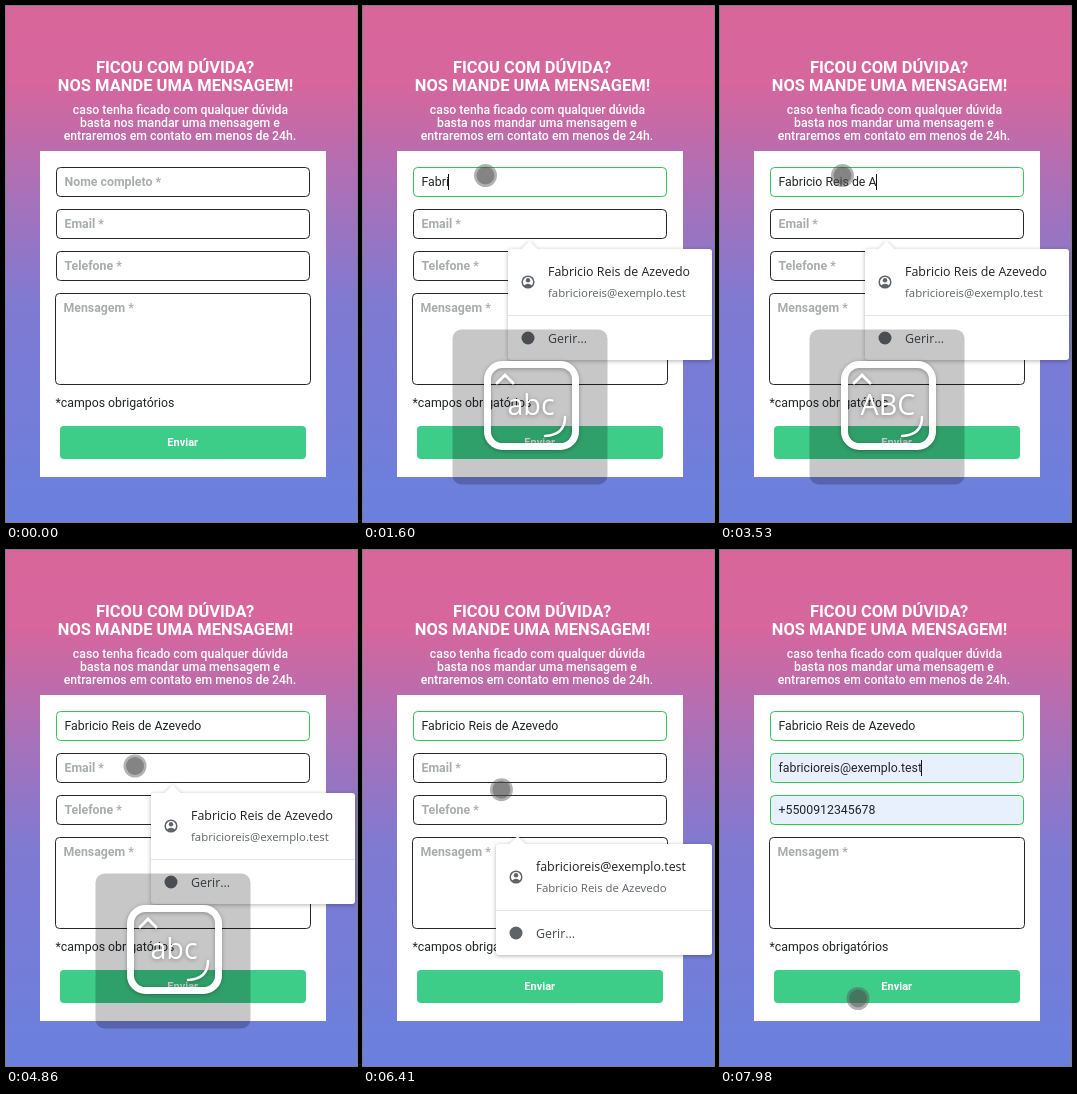
Recreate the animation shown at these times as an HTML page. Size 351 px wide and 516 px high, loop 8000 ms.

```html
<!DOCTYPE html>
<html lang="pt">
<head>
<meta charset="utf-8">
<style>
html, body { margin: 0; width: 100%; height: 100%; overflow: hidden; }
svg { display: block; width: 351px; height: 516px; }
text { font: 12.32px Roboto, sans-serif; fill: #212529; white-space: pre; }
.title { font-size: 16.5px; font-weight: 700; fill: #fff; text-anchor: middle; }
.sub { font-size: 12.25px; font-weight: 500; fill: #fff; text-anchor: middle; }
.hint { font-weight: 700; fill: #a9acae; }
.send { font-size: 11px; font-weight: 700; fill: #fff; text-anchor: middle; }
.box { fill: #fff; stroke: #24272b; }
.popup text { font: 12.4px "Open Sans", sans-serif; fill: #202124; }
.popup .small { font-size: 11.4px; fill: #5f6368; }
.popup { filter: drop-shadow(0 1px 2px rgba(0,0,0,.3)); transform-box: fill-box; }
#caps text { font: 28.7px "Open Sans", sans-serif; fill: #fff; text-anchor: middle; }
#key { fill: none; stroke: #fff; stroke-linecap: round; }
#mark { filter: drop-shadow(0 1px 2px rgba(0,0,0,.3)); }
</style>
</head>
<body>
<svg viewBox="0 0 351 516">
  <defs>
    <linearGradient id="sky" x1="0" y1="0" x2="0" y2="1">
      <stop offset="0" stop-color="#d8669b"/>
      <stop offset=".15" stop-color="#d6669c"/>
      <stop offset=".37" stop-color="#a771b9"/>
      <stop offset=".58" stop-color="#7f7ad2"/>
      <stop offset="1" stop-color="#6b80de"/>
    </linearGradient>
  </defs>
  <rect width="351" height="516" fill="url(#sky)"/>
  <text class="title" x="169" y="67">FICOU COM DÚVIDA?</text>
  <text class="title" x="169.5" y="85">NOS MANDE UMA MENSAGEM!</text>
  <text class="sub" x="174.5" y="108">caso tenha ficado com qualquer dúvida</text>
  <text class="sub" x="174" y="121">basta nos mandar uma mensagem e</text>
  <text class="sub" x="174" y="134">entraremos em contato em menos de 24h.</text>
  <rect x="34" y="145" width="286" height="326" fill="#fff"/>
  <g id="fields"></g>
  <rect class="box" x="49.5" y="287.5" width="255" height="91" rx="4"/>
  <text class="hint" x="57.5" y="306">Mensagem *</text>
  <text x="49.5" y="401">*campos obrigatórios</text>
  <rect x="54" y="420" width="246" height="33" rx="4" fill="#3dcd88"/>
  <text class="send" x="176.7" y="440">Enviar</text>
  <rect id="caret" width="1" height="16" fill="#111"/>
  <g id="popups"></g>
  <g id="caps">
    <rect x="89.5" y="323.5" width="155" height="155" rx="9" fill="#000" fill-opacity=".22"/>
    <g id="mark">
      <g id="key">
        <rect x="124.5" y="358.5" width="88" height="82" rx="15" stroke-width="7"/>
        <path d="M134 377l8-8 8 8" stroke-width="3"/>
        <path d="M202 411Q202 429 182 430" stroke-width="2.5"/>
      </g>
      <text id="label" x="168" y="409"></text>
    </g>
  </g>
  <g id="touch">
    <circle r="11.5" fill="#555" fill-opacity=".45"/>
    <circle r="9" fill="#444" fill-opacity=".42"/>
  </g>
  <path id="arrow" d="M0 0v16l3.8-3.5 2.6 6 2.6-1.2-2.6-5.8h5.2z" fill="#fff" stroke="#111"/>
</svg>
<script>
const LOOP = 8000;
const NAME = 'Fabricio Reis de Azevedo';
const MAIL = 'fabricioreis@exemplo.test';
const PHONE = '+5500912345678';

// One time per typed letter of NAME
const KEYS = [850, 1250, 1340, 1430, 1600, 1800, 1900, 2000, 2200, 2470, 2780, 2860,
  2940, 3080, 3180, 3280, 3380, 3530, 3870, 3870, 3930, 4130, 4200, 4260];
const UPPER = [[720, 1050], [2270, 2540], [3450, 3670]];
const FOCUS = 220, REFOCUS = 5500, PREVIEW = 6480, FILL = 6670;
// time, x, y of the pointer
const PATH = [[0, 122.5, 169.5], [4660, 122.5, 169.5], [4860, 129, 216], [5000, 127, 222],
  [6340, 127, 222], [6600, 189.5, 318.5], [7200, 189.5, 318.5], [7650, 138, 448.5]];

const $ = id => document.getElementById(id);
const ramp = (t, a, b) => Math.min(1, Math.max(0, (t - a) / (b - a)));
const ease = p => p * p * (3 - 2 * p);
const within = (t, [a, b]) => t >= a && t < b;

const fields = ['Nome completo *', 'Email *', 'Telefone *'].map((hint, i) => {
  const y = 161.5 + 42 * i, g = document.createElementNS('http://www.w3.org/2000/svg', 'g');
  g.innerHTML = `<rect class="box" x="50.5" y="${y}" width="253" height="29" rx="4"/>
    <text class="hint" x="58.5" y="${y + 18.5}">${hint}</text>
    <text x="58.5" y="${y + 18.5}"></text>`;
  $('fields').append(g);
  const [box, label, value] = g.children;
  return { y, box, label, value };
});

function popup(x, y, big, small) {
  const w = 349 - x, cx = x + 20, tail = x + 21.5;
  $('popups').insertAdjacentHTML('beforeend', `<g class="popup">
    <path d="M${x + 3} ${y}H${tail - 8}l8-8 8 8H346q3 0 3 3v105q0 3-3 3H${x + 3}q-3 0-3-3v-105q0-3 3-3z" fill="#fff"/>
    <rect x="${x}" y="${y + 3}" width="${w}" height="63" fill="#f1f1f1" opacity="0"/>
    <path d="M${x} ${y + 66.5}h${w}" stroke="#e4e4e4"/>
    <g fill="#5f6368"><circle cx="${cx}" cy="${y + 33}" r="5.8" fill="none" stroke="#5f6368" stroke-width="1.5"/>
    <circle cx="${cx}" cy="${y + 31.2}" r="2.2"/>
    <path d="M${cx - 4.3} ${y + 36.8}q4.3-4 8.6 0-4.3 4-8.6 0z"/>
    <circle cx="${cx}" cy="${y + 89}" r="6.5"/></g>
    <text x="${x + 40}" y="${y + 27}">${big}</text>
    <text class="small" x="${x + 40}" y="${y + 48}">${small}</text>
    <text x="${x + 40}" y="${y + 94}" style="fill:#45494d">Gerir...</text></g>`);
  return $('popups').lastElementChild;
}
const popups = [popup(145, 243, NAME, MAIL), popup(133, 294, MAIL, NAME)];

function setField(i, value, valid, blue) {
  const f = fields[i];
  f.value.textContent = value;
  f.label.style.opacity = value ? 0 : 1;
  f.box.style.stroke = valid ? '#2fc655' : '';
  f.box.style.fill = blue ? '#e8f0fe' : '';
}

function pointer(t) {
  let i = PATH.length - 1;
  while (PATH[i][0] > t) i--;
  const a = PATH[i], b = PATH[i + 1] || a;
  const p = a === b ? 0 : ease(ramp(t, a[0], b[0]));
  return `translate(${a[1] + (b[1] - a[1]) * p} ${a[2] + (b[2] - a[2]) * p})`;
}

function draw(t) {
  const typed = KEYS.filter(k => k <= t).length;
  const filled = t >= PREVIEW;
  setField(0, NAME.slice(0, typed), t >= 1250);
  setField(1, filled ? MAIL : '', t >= FILL, filled);
  setField(2, filled ? PHONE : '', t >= FILL, filled);

  // Caret blinks every half second after the latest edit
  const edits = [FOCUS, ...KEYS, REFOCUS, FILL].filter(k => k <= t);
  const active = fields[t < REFOCUS ? 0 : 1];
  const since = t - edits[edits.length - 1];
  const x = t >= PREVIEW && t < FILL ? 58 : 58 + active.value.getComputedTextLength();
  $('caret').setAttribute('x', Math.round(x));
  $('caret').setAttribute('y', active.y + 6.5);
  $('caret').style.opacity = edits.length && since % 1000 < 500 ? 1 : 0;

  const [first, second] = popups;
  first.style.opacity = ramp(t, 200, 360) * (1 - ramp(t, 5460, 5600));
  const leave = ramp(t, 6680, 6960);
  second.style.opacity = ramp(t, 5600, 5760) * (1 - leave);
  second.style.transformOrigin = '50% 50%';
  second.style.transform = `scale(${1 - leave * .055})`;
  second.children[1].setAttribute('opacity', ramp(t, 6460, 6500));

  $('caps').style.opacity = ramp(t, 720, 900) * (1 - ramp(t, 5860, 6300));
  $('label').textContent = UPPER.some(u => within(t, u)) ? 'ABC' : 'abc';

  const place = pointer(t);
  $('touch').setAttribute('transform', place);
  $('arrow').setAttribute('transform', place);
  const touch = t < 7000 ? ramp(t, 70, 220) * (1 - ramp(t, 6640, 6780)) : ramp(t, 7650, 7900);
  $('touch').style.opacity = touch;
  $('arrow').style.opacity = t >= 6640 && t < 7760 ? 1 : 0;
}

function tick() {
  draw(performance.now() % LOOP);
  requestAnimationFrame(tick);
}
tick();
</script>
</body>
</html>
```
